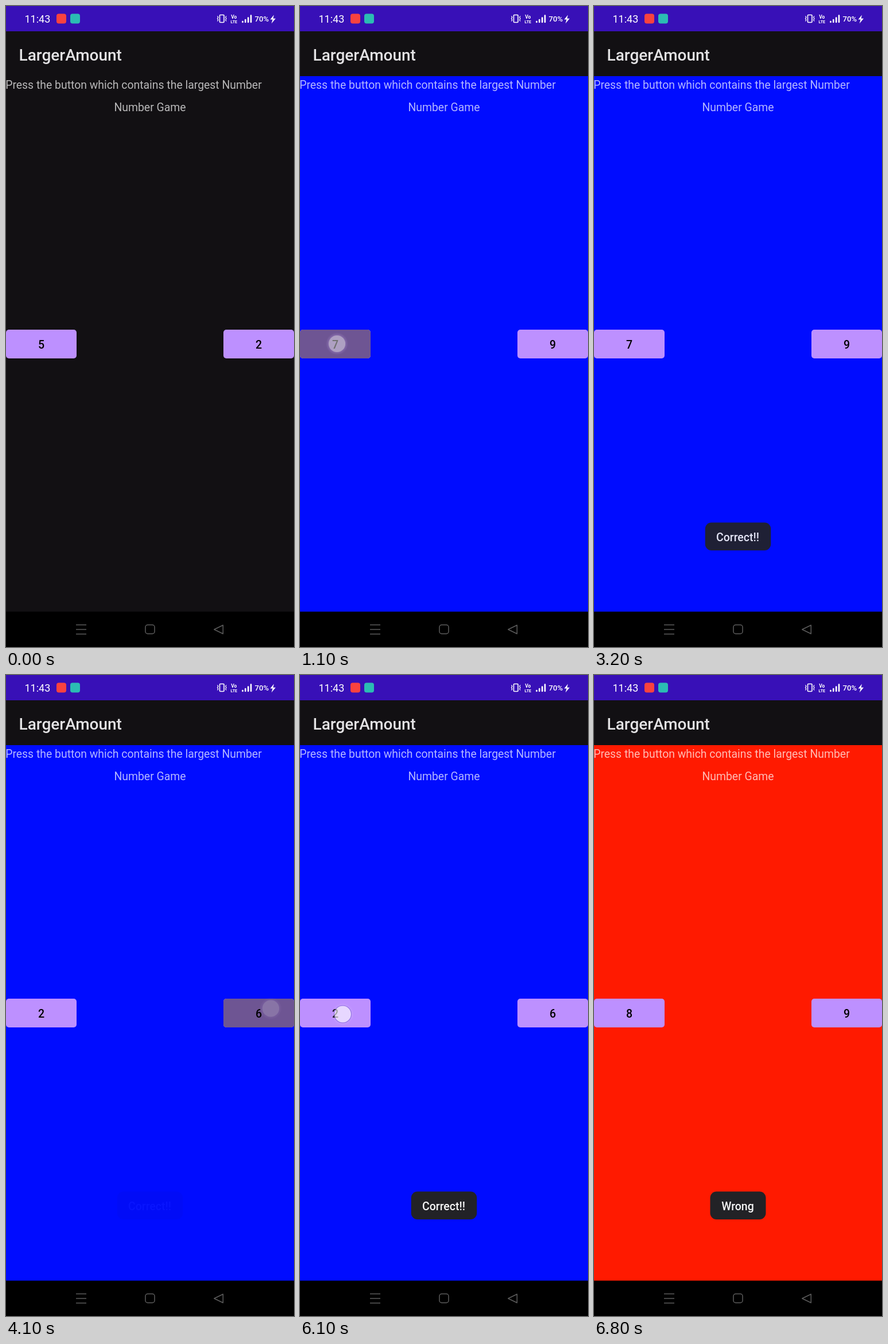
Write an HTML page that moves like this. It is 502 by 1115 pixels and loops after 8 s.

```html
<!DOCTYPE html>
<html lang="en">
<head>
<meta charset="utf-8">
<title>Number Game</title>
<style>
  html, body { margin: 0; width: 100%; height: 100%; overflow: hidden; background: #000; }
  svg { display: block; width: 100%; height: 100%; font-family: Roboto, sans-serif; }
  .body { font-size: 19.4px; fill: #fff; fill-opacity: .7; }
  .medium { font-size: 19.5px; font-weight: 500; }
  .mid { text-anchor: middle; }
  .nav { fill: none; stroke: #5c5c5c; stroke-width: 1.5; stroke-linejoin: round; }
</style>
</head>
<body>
<svg viewBox="0 0 502 1115">
  <defs>
    <clipPath id="clip0"><rect y="563" width="123" height="50" rx="5"/></clipPath>
    <clipPath id="clip1"><rect x="379" y="563" width="123" height="50" rx="5"/></clipPath>
    <radialGradient id="halo">
      <stop offset=".7" stop-color="#d9bcff" stop-opacity=".55"/>
      <stop offset="1" stop-color="#d9bcff" stop-opacity="0"/>
    </radialGradient>
  </defs>

  <rect width="502" height="1115" fill="#121013"/>
  <rect id="page" y="122" width="502" height="932"/>
  <rect width="502" height="44" fill="#3810b7"/>
  <rect y="1053.5" width="502" height="61.5"/>

  <g id="status" fill="#fff">
    <text x="32.5" y="28.5" font-size="18">11:43</text>
    <rect x="88" y="13.5" width="17" height="17" rx="4" fill="#f9423f"/>
    <rect x="112" y="13.5" width="17" height="17" rx="4" fill="#2bbcb3"/>
    <rect x="372.5" y="15.5" width="7.5" height="13" rx="1" fill="none" stroke="#fff" stroke-width="1.6"/>
    <path d="M368.5 17.5l1.3 2.2-1.3 2.3 1.3 2.3-1.3 2.2M384 17.5l-1.3 2.2 1.3 2.3-1.3 2.3 1.3 2.2" fill="none" stroke="#fff" stroke-width="1.3"/>
    <g font-size="8.5" font-weight="700" class="mid">
      <text x="397.3" y="21.5">Vo</text>
      <text x="397.3" y="29.5" font-size="7">LTE</text>
    </g>
    <path d="M412.5 28v-1M417.3 28v-4M422.2 28v-7.5M427 28v-11.5" stroke="#fff" stroke-width="2.6" stroke-linecap="round"/>
    <text x="433.5" y="27" font-size="13.2" font-weight="500">70%</text>
    <path d="M467 15.5l-6.5 8h4.2l-2 7 7.3-8.8h-4.4z"/>
  </g>

  <text x="22.5" y="94.5" font-size="28" font-weight="500" fill="#e3e2e4">LargerAmount</text>
  <text class="body" x="-.8" y="143.5">Press the button which contains the largest Number</text>
  <text class="body mid" x="251" y="182.5">Number Game</text>

  <g id="buttons"></g>
  <g id="toasts"></g>
  <g id="dot">
    <circle r="19.5" fill="url(#halo)"/>
    <circle r="14.6" fill="#fff"/>
    <circle id="rim" r="15" fill="none" stroke="#6a55c8" stroke-width="1.2"/>
  </g>

  <path class="nav" d="M122 1076.5h18M122 1084.5h18M122 1092.5h18"/>
  <rect class="nav" x="243" y="1076.5" width="16" height="15.5" rx="4"/>
  <path class="nav" d="M378.3 1077v15l-15.5-7.5z"/>
</svg>
<script>
const LOOP = 8000, STEP = 100, FADE = 500;
const DARK = '#121013', BLUE = '#000cff', RED = '#ff1a00';
const $ = id => document.getElementById(id);
const set = (el, attrs) => {
  for (const name in attrs) el.setAttribute(name, attrs[name]);
};

// Each tap swaps the numbers and page colour, then shows a toast until `hide`.
const taps = [
  { at: 1000, side: 0, x: 64.5, y: 587.5, numbers: [7, 9], page: BLUE, toast: 'Correct!!', width: 114.5, hide: 3115 },
  { at: 3900, side: 1, x: 461.5, y: 580, numbers: [2, 6], page: BLUE, toast: 'Correct!!', width: 114.5, hide: 6105 },
  { at: 6100, side: 0, x: 74.5, y: 590, numbers: [8, 9], page: RED, toast: 'Wrong', width: 97, hide: Infinity }
];
const start = { numbers: [5, 2], page: DARK };

$('buttons').innerHTML = [0, 379].map((x, i) => `
  <rect x="${x}" y="563" width="123" height="50" rx="5" fill="#bd90ff"/>
  <circle id="ripple${i}" cx="${x + 61.5}" cy="588" fill="#6e5593" clip-path="url(#clip${i})"/>
  <text id="number${i}" class="medium mid" x="${x + 61.5}" y="596"/>`).join('');

$('toasts').innerHTML = taps.map((tap, i) => `
  <g id="toast${i}">
    <rect x="${251 - tap.width / 2}" y="898.5" width="${tap.width}" height="48.5" rx="11" fill="#222226"/>
    <text class="medium mid" x="250.5" y="931" fill="#f5f5f5">${tap.toast}</text>
  </g>`).join('');

// Eased 0..1 progress of a fade that begins at `from`.
const fade = (t, from) => {
  const u = Math.min(1, Math.max(0, (t - from) / FADE));
  return (1 - Math.cos(Math.PI * u)) / 2;
};

// Piecewise linear value through points spaced one STEP apart.
const along = (points, ms) => {
  if (ms < 0) return 0;
  const i = Math.floor(ms / STEP), a = points[i] || 0, b = points[i + 1] || 0;
  return a + (b - a) * (ms / STEP - i);
};

function draw(time) {
  const t = Math.floor(time / STEP) * STEP;
  const state = taps.filter(tap => t >= tap.at + 100).pop() || start;
  const touch = taps.filter(tap => t >= tap.at).pop();
  const age = touch ? t - touch.at : -1;

  set($('page'), { fill: state.page });
  [0, 1].forEach(i => {
    const active = touch && touch.side === i;
    $('number' + i).textContent = state.numbers[i];
    set($('ripple' + i), {
      r: Math.min(70, 60 + age / 20),
      opacity: active ? along([0, 1, 1, .55, .2], age) : 0
    });
  });

  taps.forEach((tap, i) => set($('toast' + i), {
    opacity: fade(t, tap.at + 145) * (1 - fade(t, tap.hide))
  }));

  set($('dot'), {
    opacity: along([.64, .44, .18], age),
    transform: touch ? `translate(${touch.x} ${touch.y})` : ''
  });
  set($('rim'), { opacity: age === 0 ? .8 : 0 });
}

const begin = performance.now();
function tick() {
  draw((performance.now() - begin) % LOOP);
  requestAnimationFrame(tick);
}
tick();
</script>
</body>
</html>
```
